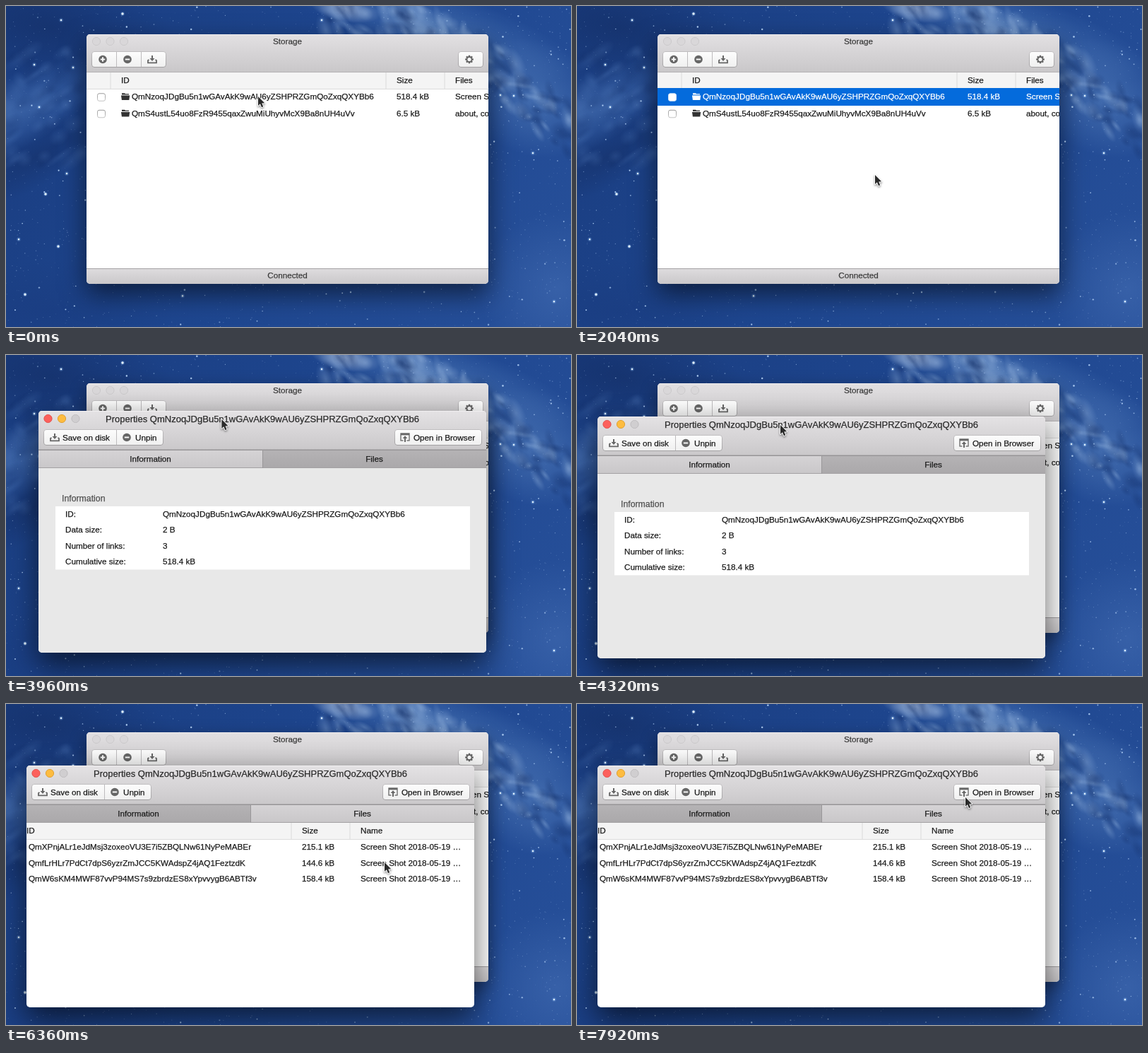
An HTML page with a canvas that plays this animation: 800x454 px, repeating every 8 s.

```html
<!DOCTYPE html>
<html lang="en">
<head>
<meta charset="utf-8">
<title>Storage</title>
<style>
html, body { margin: 0; width: 100%; height: 100%; overflow: hidden; background: #1f4a94; }
canvas { display: block; }
</style>
</head>
<body>
<canvas id="stage" width="800" height="454"></canvas>
<script>
const W = 800, H = 454, LOOP = 8000, STEP = 120;
const FACE = '"Liberation Sans", Arial, sans-serif';
const INK = '#1c1c1c', ICON = '#666';
const HASH = 'QmNzoqJDgBu5n1wGAvAkK9wAU6yZSHPRZGmQoZxqQXYBb6';
const PINS = [
  [HASH, '518.4 kB', 'Screen Shot 2018-05-19 …'],
  ['QmS4ustL54uo8FzR9455qaxZwuMiUhyvMcX9Ba8nUH4uVv', '6.5 kB', 'about, contact, help']
];
const LINKS = [
  ['QmXPnjALr1eJdMsj3zoxeoVU3E7i5ZBQLNw61NyPeMABEr', '215.1 kB'],
  ['QmfLrHLr7PdCt7dpS6yzrZmJCC5KWAdspZ4jAQ1FeztzdK', '144.6 kB'],
  ['QmW6sKM4MWF87vvP94MS7s9zbrdzES8xYpvvygB6ABTf3v', '158.4 kB']
];
const INFO = [['ID:', HASH], ['Data size:', '2 B'], ['Number of links:', '3'], ['Cumulative size:', '518.4 kB']];

// Event times in ms
const SELECT = 600, OPEN = 2520, LOADED = 3720, SHOW_FILES = 5040;
const CURSOR = [
  [0, 357, 128], [960, 357, 128], [1680, 422, 239], [2640, 422, 239],
  [3360, 354, 73], [3480, 355, 68], [4200, 288, 99], [4440, 288, 99],
  [4920, 492, 155], [5100, 492, 155], [5520, 386, 211], [6000, 386, 211],
  [6360, 536, 224], [6960, 536, 224], [7680, 550, 132], [8000, 550, 132]
];
const WINDOW = [[3480, 96, 56], [4200, 29, 87]];
const SCROLL = [[5580, 0], [5940, 49]];

const g = document.getElementById('stage').getContext('2d');
let c = g;

function along(keys, t) {
  let i = 0;
  while (i < keys.length - 2 && t >= keys[i + 1][0]) i++;
  const a = keys[i], b = keys[i + 1];
  const p = Math.min(1, Math.max(0, (t - a[0]) / (b[0] - a[0])));
  const e = p * p * (3 - 2 * p);
  return a.slice(1).map((v, k) => v + (b[k + 1] - v) * e);
}

function rand(seed) {
  return () => {
    seed = (seed + 0x6d2b79f5) | 0;
    let n = Math.imul(seed ^ (seed >>> 15), seed | 1);
    n ^= n + Math.imul(n ^ (n >>> 7), n | 61);
    return ((n ^ (n >>> 14)) >>> 0) / 4294967296;
  };
}

function rect(x, y, w, h, fill) {
  c.fillStyle = fill;
  c.fillRect(x, y, w, h);
}

function fade(y, h, top, bottom) {
  const f = c.createLinearGradient(0, y, 0, y + h);
  f.addColorStop(0, top);
  f.addColorStop(1, bottom);
  return f;
}

function round(x, y, w, h, r) {
  c.beginPath();
  c.roundRect(x, y, w, h, r);
}

function poly(points) {
  c.beginPath();
  points.forEach(([x, y]) => c.lineTo(x, y));
  c.closePath();
}

function disc(x, y, r, fill, stroke) {
  c.beginPath();
  c.arc(x, y, r, 0, 7);
  c.fillStyle = fill;
  c.fill();
  if (stroke) {
    c.strokeStyle = stroke;
    c.lineWidth = 1;
    c.stroke();
  }
}

// y is the middle of the capitals; the hairline outline thickens the strokes
function text(s, x, y, color = INK, size = 11.7, align = 'left') {
  c.font = `${size}px ${FACE}`;
  c.textAlign = align;
  c.fillStyle = c.strokeStyle = color;
  c.lineWidth = 0.25;
  c.fillText(s, x, y + size * 0.35);
  c.strokeText(s, x, y + size * 0.35);
}

function blob(x, y, rx, ry, angle, rgb, alpha) {
  c.save();
  c.translate(x, y);
  c.rotate(angle);
  c.scale(rx, ry);
  const f = c.createRadialGradient(0, 0, 0, 0, 0, 1);
  f.addColorStop(0, `rgba(${rgb},${alpha})`);
  f.addColorStop(0.5, `rgba(${rgb},${alpha * 0.5})`);
  f.addColorStop(1, `rgba(${rgb},0)`);
  c.fillStyle = f;
  c.fillRect(-1, -1, 2, 2);
  c.restore();
}

function paintSky() {
  const sky = document.createElement('canvas');
  sky.width = W;
  sky.height = H;
  c = sky.getContext('2d');
  const base = c.createLinearGradient(0, 0, W, H);
  base.addColorStop(0, '#1a3d80');
  base.addColorStop(0.5, '#1e468f');
  base.addColorStop(1, '#27509a');
  rect(0, 0, W, H, base);
  blob(60, 30, 190, 80, 0.2, '15,36,84', 0.4);
  blob(40, 215, 150, 40, -0.5, '20,46,100', 0.5);
  blob(25, 145, 130, 50, -0.5, '86,130,196', 0.5);
  blob(60, 430, 180, 70, 0, '24,56,122', 0.4);
  blob(780, 400, 110, 110, 0.4, '80,122,190', 0.4);
  blob(600, 25, 220, 50, 0.3, '100,145,205', 0.45);
  blob(745, 130, 100, 80, 0.5, '105,148,205', 0.45);
  blob(480, 4, 50, 18, 0.2, '205,220,240', 0.65);
  blob(575, 20, 60, 28, 0.5, '160,190,225', 0.55);

  // Mottled dust along the bright band
  const r = rand(77);
  for (let i = 0; i < 150; i++) {
    const p = r();
    const tone = r() < 0.5 ? '165,195,232' : '18,46,104';
    blob(440 + p * 340 + r() * 30, p * p * 170 + (r() - 0.4) * 70, 6 + r() * 20, 4 + r() * 9, r() * 1.4, tone, 0.32);
  }
  for (let i = 0; i < 60; i++) {
    blob(r() * 110, 60 + r() * 170, 8 + r() * 20, 5 + r() * 10, -0.6, r() < 0.5 ? '90,132,196' : '18,46,104', 0.2);
  }
  for (let i = 0; i < 2000; i++) {
    const x = r() * W, y = r() * H, big = r() ** 9;
    disc(x, y, 0.45 + big * 0.85, `rgba(190,220,255,${0.15 + r() * 0.5 + big * 0.35})`);
  }
  const bright = [[74, 340], [56, 266], [165, 11], [27, 408], [47, 143], [78, 20], [95, 87], [40, 83], [18, 330], [86, 237], [700, 126], [719, 127], [746, 208], [776, 418], [447, 20], [250, 410]];
  bright.forEach(([x, y], i) => {
    blob(x, y, 3.5, 3.5, 0, '150,200,255', 0.6);
    disc(x, y, i < 4 ? 1.7 : 1.2, '#e4f3ff');
  });
  c = g;
  return sky;
}

function panel(x, y, w, h, fill, shadow, blur, drop) {
  c.save();
  c.shadowColor = `rgba(0,0,0,${shadow})`;
  c.shadowBlur = blur;
  c.shadowOffsetY = drop;
  round(x, y, w, h, 5);
  c.fillStyle = fill;
  c.fill();
  c.restore();
}

function button(x, y, w, dividers = []) {
  round(x + 0.5, y + 0.5, w - 1, 22, 3.5);
  c.fillStyle = fade(y, 22, '#fdfdfd', '#f0f0f0');
  c.fill();
  c.strokeStyle = fade(y, 22, '#c0bec0', '#a3a1a3');
  c.lineWidth = 1;
  c.stroke();
  dividers.forEach(d => rect(d, y + 1, 1, 21, '#bdbbbd'));
}

function sign(x, y, plus) {
  disc(x, y, 5.8, ICON);
  rect(x - 3.2, y - 1, 6.4, 2, '#f7f7f7');
  if (plus) rect(x - 1, y - 3.2, 2, 6.4, '#f7f7f7');
}

function save(x, y) {
  c.strokeStyle = ICON;
  c.lineWidth = 1.8;
  c.beginPath();
  c.moveTo(x - 4.5, y + 0.5);
  c.lineTo(x - 6, y + 1.5);
  c.lineTo(x - 6, y + 4.8);
  c.lineTo(x + 6, y + 4.8);
  c.lineTo(x + 6, y + 1.5);
  c.lineTo(x + 4.5, y + 0.5);
  c.stroke();
  rect(x - 1, y - 5.5, 2, 4.5, ICON);
  poly([[x - 3.5, y - 1.5], [x + 3.5, y - 1.5], [x, y + 2.5]]);
  c.fillStyle = ICON;
  c.fill();
}

function gear(x, y) {
  c.save();
  c.translate(x, y);
  for (let i = 0; i < 8; i++) {
    rect(-1.2, -5.8, 2.4, 3, ICON);
    c.rotate(Math.PI / 4);
  }
  c.restore();
  disc(x, y, 4.5, ICON);
  disc(x, y, 2.6, '#f7f7f7');
}

function browser(x, y) {
  c.strokeStyle = ICON;
  c.lineWidth = 1.3;
  c.strokeRect(x - 6, y - 5.5, 12, 10);
  rect(x - 6, y - 5.5, 12, 2.4, ICON);
  rect(x - 2.5, y + 3, 5, 3, '#f5f5f5');
  rect(x - 1, y, 2, 6.5, ICON);
  poly([[x - 3.4, y + 1.5], [x + 3.4, y + 1.5], [x, y - 2.3]]);
  c.fillStyle = ICON;
  c.fill();
}

function folder(x, y, color) {
  c.fillStyle = color;
  poly([[x + 1, y - 2.7], [x + 1, y - 5], [x + 5, y - 5], [x + 6, y - 4], [x + 11, y - 4], [x + 11, y - 2.7]]);
  c.fill();
  poly([[x, y - 1.8], [x + 12.2, y - 1.8], [x + 11.3, y + 4.6], [x + 0.9, y + 4.6]]);
  c.fill();
}

function checkbox(x, y, on) {
  round(x + 0.5, y - 4.5, 11, 10.5, 2.5);
  c.fillStyle = '#fff';
  c.fill();
  c.strokeStyle = on ? '#d5e4f7' : fade(y - 5, 11, '#989898', '#c4c4c4');
  c.lineWidth = 1;
  c.stroke();
}

function lights(x, y, colors, rim) {
  colors.forEach((fill, i) => disc(x + i * 19.5, y, 5.6, fill, rim[i]));
}

function header(x, y, w, columns) {
  rect(x, y, w, 24, '#f4f4f4');
  rect(x, y + 23, w, 1, '#dcdcdc');
  columns.forEach(([label, at]) => {
    rect(at - 15.5, y, 1, 23, '#d9d9d9');
    text(label, at, y + 11);
  });
}

function mainWindow(selected, focused) {
  const x = 114, y = 40, w = 569, h = 353;
  panel(x, y, w, h, '#fff', focused ? 0.55 : 0.4, focused ? 36 : 24, focused ? 14 : 8);
  c.save();
  round(x, y, w, h, 5);
  c.clip();
  rect(x, y, w, 54, fade(y, 54, '#e2e0e2', '#c9c7c9'));
  rect(x, y, w, 1, '#edebed');
  rect(x, 93, w, 1, '#b4b2b4');
  lights(128, 50, Array(3).fill('#d9d7d9'), Array(3).fill('#cbc9cb'));
  text('Storage', 398.5, 50, '#3c3c3c', 11.7, 'center');
  button(121, 64, 106, [156, 191]);
  sign(137, 75.5, true);
  sign(172, 75.5);
  save(207, 75.5);
  button(640, 64, 36);
  gear(656, 75.5);
  header(x, 94, w, [['ID', 163], ['Size', 553], ['Files', 636]]);
  PINS.forEach(([id, size, files], i) => {
    const mid = 128.3 + i * 23.5, on = selected && i === 0;
    const ink = on ? '#fff' : INK;
    if (on) rect(x, 116, w, 25, '#046bdc');
    checkbox(129, mid, on);
    folder(163, mid, on ? '#fff' : '#333');
    text(id, 178, mid, ink);
    text(size, 553, mid, ink);
    text(files, 636, mid, ink);
  });
  rect(x, 371, w, 22, fade(371, 22, '#dedcde', '#cac8ca'));
  rect(x, 371, w, 1, '#a5a3a5');
  text('Connected', 398.5, 381, '#3c3c3c', 11.7, 'center');
  c.restore();
}

function spinner(x, y, t) {
  const head = (Math.floor(t * 0.012) + 11) % 12;
  c.save();
  c.translate(x, y);
  for (let i = 0; i < 12; i++) {
    const age = (head - i + 12) % 12;
    const v = Math.round(38 + 135 * Math.max(0, (age - 2) / 9) ** 1.2);
    c.save();
    c.rotate(i * Math.PI / 6);
    round(-2.5, -21.8, 5, 12, 2);
    c.fillStyle = `rgb(${v},${v},${v})`;
    c.fill();
    c.restore();
  }
  c.restore();
}

function tab(x, w, label, on) {
  rect(x, 55, w, 26, on ? fade(55, 26, '#d6d4d6', '#c9c7c9') : fade(55, 26, '#b5b3b5', '#aaa8aa'));
  text(label, x + w / 2, 67.5, INK, 11.7, 'center');
}

function infoTab() {
  rect(0, 81, 634, 261, '#e8e8e8');
  text('Information', 33, 124, '#505050', 12.3);
  rect(24, 135, 587, 89.5, '#fff');
  INFO.forEach(([label, value], i) => {
    text(label, 38, 145.5 + i * 22.5);
    text(value, 176, 145.5 + i * 22.5);
  });
}

function filesTab(scroll) {
  header(0, 81, 634, [['ID', 49 - scroll], ['Size', 439 - scroll], ['Name', 522 - scroll]]);
  LINKS.forEach(([id, size], i) => {
    const y = 115.3 + i * 22.5;
    text(id, 52 - scroll, y);
    text(size, 439 - scroll, y);
    text('Screen Shot 2018-05-19 …', 522 - scroll, y);
  });
}

function propsWindow(t) {
  const [x, y] = along(WINDOW, t).map(Math.round);
  const w = 634, h = 342, loaded = t >= LOADED, files = t >= SHOW_FILES;
  const bar = loaded ? 55 : 22;
  c.save();
  c.translate(x, y);
  panel(0, 0, w, h, '#fff', 0.6, 42, 17);
  round(0, 0, w, h, 5);
  c.clip();
  rect(0, 0, w, bar, fade(0, bar, '#e4e2e4', loaded ? '#cac8ca' : '#d0ced0'));
  rect(0, 0, w, 1, '#f1eff1');
  rect(0, bar - 1, w, 1, '#b2b0b2');
  lights(13.5, 11, ['#fc605c', '#fdbc40', '#d0ced0'], ['#e2504c', '#dfa033', '#bebcbe']);
  text('Properties ' + HASH, w / 2, 11.5, '#2b2b2b', 13, 'center');
  if (!loaded) {
    spinner(316.5, 182, t);
  } else {
    button(7, 26, 170, [110]);
    save(23, 37.5);
    text('Save on disk', 34, 37.5);
    sign(125, 37.5);
    text('Unpin', 137, 37.5);
    button(504, 26, 124);
    browser(519, 37.5);
    text('Open in Browser', 531, 37.5);
    if (files) filesTab(along(SCROLL, t)[0]);
    else infoTab();
    tab(0, 317, 'Information', !files);
    tab(317, 317, 'Files', files);
    rect(0, 55, w, 1, '#959395');
    rect(0, 80, w, 1, '#a3a1a3');
    rect(317, 55, 1, 26, '#999799');
  }
  c.restore();
}

function cursor(x, y) {
  c.save();
  c.translate(x, y);
  poly([[0, 0], [0, 13], [2.9, 10.3], [5, 15.2], [7.2, 14.2], [5.2, 9.5], [9.2, 9.3]]);
  c.lineJoin = 'round';
  c.lineWidth = 1.8;
  c.strokeStyle = '#fff';
  c.shadowColor = 'rgba(0,0,0,.45)';
  c.shadowBlur = 3;
  c.shadowOffsetY = 1.5;
  c.stroke();
  c.shadowColor = 'transparent';
  c.fillStyle = '#2a2a2a';
  c.fill();
  c.restore();
}

const sky = paintSky();

function draw(now) {
  const t = Math.floor((now % LOOP) / STEP) * STEP;
  const open = t >= OPEN;
  c.drawImage(sky, 0, 0);
  mainWindow(t >= SELECT && !open, !open);
  if (open) propsWindow(t);
  cursor(...along(CURSOR, t));
  requestAnimationFrame(draw);
}
draw(performance.now());
</script>
</body>
</html>
```
